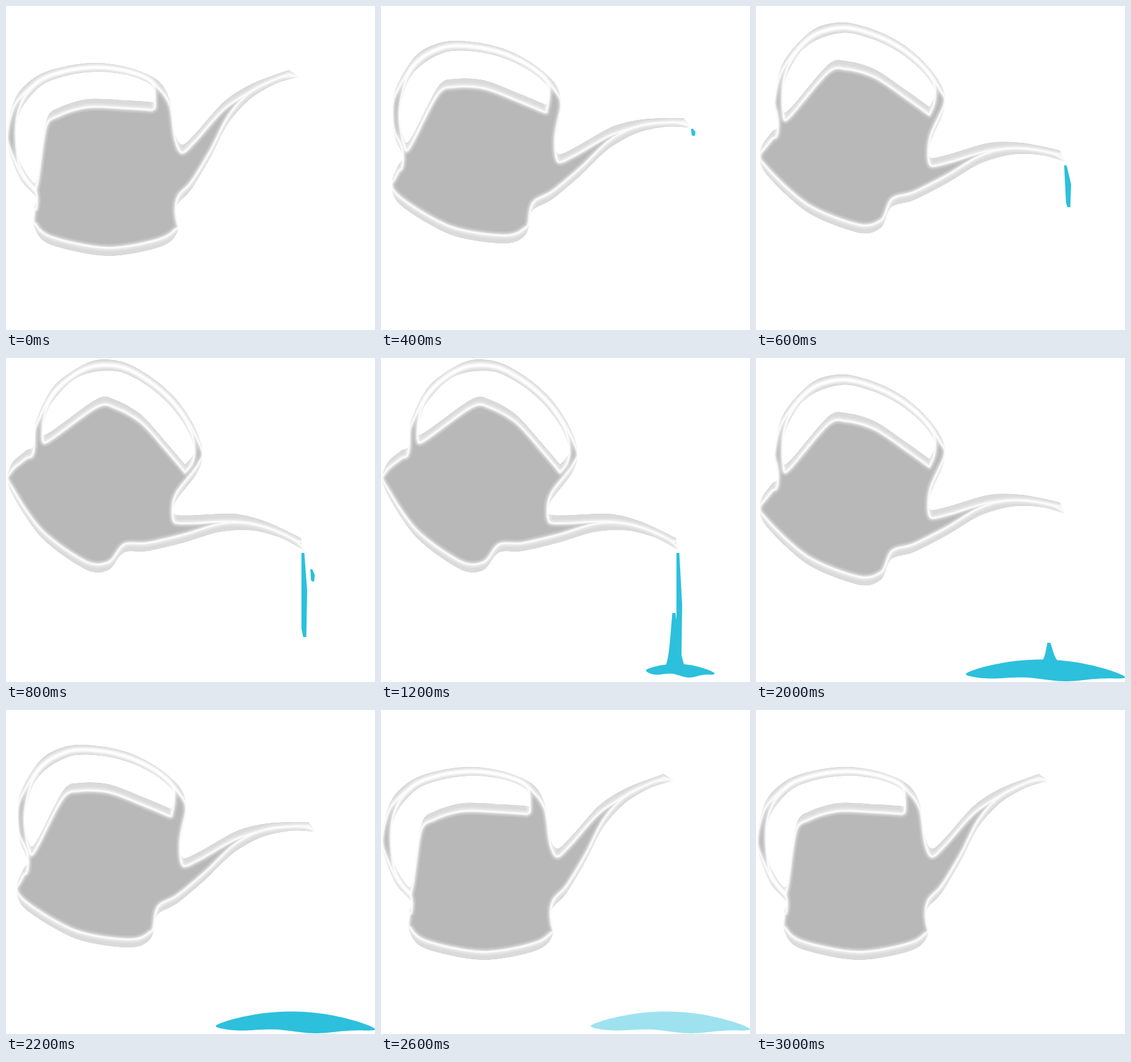
These frames come from a looping animation (582x512 px, 4 s). An HTML page with a canvas:

```html
<!DOCTYPE html>
<html lang="en">
<head>
<meta charset="utf-8">
<title>Watering can</title>
<style>
html, body { margin: 0; width: 100%; height: 100%; overflow: hidden; background: #fff; }
canvas { display: block; }
</style>
</head>
<body>
<canvas id="stage" width="582" height="512"></canvas>
<script>
const ctx = document.getElementById('stage').getContext('2d');
const STEP = 200, LOOP = 4000;
const WATER = '#2cc0dc';

const points = text => text.trim().split(/\s+/).map(p => p.split(',').map(Number));

// The upright can: spout, base, handle and back to the spout.
const RIM = points(`446,101 462,112 425,123 385,147 350,186 322,240 292,290 268,318
  271,355 245,380 160,395 70,377 45,350 45,318 48,303
  22,272 2,212 15,145 50,110 100,94 150,90 200,99 240,118 258,148 266,200
  278,219 300,200 345,150 390,122`);
const HOLE = points(`40,276 20,240 16,190 29,155 60,123 105,108 150,104 195,110 230,126
  235,152 190,149 130,147 85,160 64,180 50,271`);

// The can turns about the foot of its handle while the foot is lifted.
const PIVOT = [47, 303];
const POSES = [
  { x: 47, y: 303, angle: 0 },
  { x: 37, y: 273.5, angle: 10 },
  { x: 34, y: 238, angle: 19 },
  { x: 34, y: 188, angle: 32 },
  { x: 43, y: 138, angle: 46 }
];

function place(pts, { x, y, angle }) {
  const c = Math.cos(angle * Math.PI / 180), s = Math.sin(angle * Math.PI / 180);
  return pts.map(([px, py]) => {
    const dx = px - PIVOT[0], dy = py - PIVOT[1];
    return [x + c * dx - s * dy, y + s * dx + c * dy];
  });
}

// Closed Hermite curve through the points, with sharp corners where asked.
function smooth(pts, corners, detail = 8) {
  const n = pts.length, out = [];
  const tangent = (i, k) => corners.includes(i) ? 0
    : (pts[(i + 1) % n][k] - pts[(i + n - 1) % n][k]) * 0.45;
  for (let i = 0; i < n; i++) {
    const j = (i + 1) % n;
    for (let s = 0; s < detail; s++) {
      const t = s / detail, t2 = t * t, t3 = t2 * t;
      out.push([0, 1].map(k =>
        (2 * t3 - 3 * t2 + 1) * pts[i][k] + (t3 - 2 * t2 + t) * tangent(i, k) +
        (3 * t2 - 2 * t3) * pts[j][k] + (t3 - t2) * tangent(j, k)));
    }
  }
  return out;
}

function trace(pts, path = new Path2D()) {
  pts.forEach(([x, y], i) => i ? path.lineTo(x, y) : path.moveTo(x, y));
  path.closePath();
  return path;
}

// The highlight is the edge shifted vertically into the shape,
// at most to the middle of thin parts and not at all on upright sides.
function insetOf(curve, shape, side) {
  const n = curve.length, maxDepth = 13;
  const shifts = curve.map(([x, y], i) => {
    const a = curve[(i + n - 1) % n], b = curve[(i + 1) % n];
    const dx = b[0] - a[0], dy = b[1] - a[1];
    const slope = side * dx / (Math.hypot(dx, dy) || 1), dir = Math.sign(slope);
    let depth = 0;
    while (depth < maxDepth && ctx.isPointInPath(shape, x, y + dir * (2 * depth + 1), 'evenodd')) depth++;
    return depth * Math.tanh(slope * 2.5);
  });
  return curve.map(([x, y], i) => {
    let sum = 0;
    for (let k = -2; k <= 2; k++) sum += shifts[(i + k + n) % n];
    return [x, y + sum / 5];
  });
}

function bevel(curve, shape, side) {
  const inset = insetOf(curve, shape, side);
  ctx.fillStyle = '#dadada';
  ctx.fill(trace([...inset].reverse(), trace(curve)));
  return trace(inset);
}

function drawCan(pose) {
  const rim = smooth(place(RIM, pose), [0, 1]);
  const hole = smooth(place(HOLE, pose), [9]);
  const shape = trace(hole, trace(rim));
  ctx.save();
  ctx.clip(shape, 'evenodd');
  ctx.fillStyle = '#b8b8b8';
  ctx.fill(shape, 'evenodd');
  const lines = [bevel(rim, shape, 1), bevel(hole, shape, -1)];
  ctx.strokeStyle = '#fff';
  ctx.lineJoin = 'round';
  for (const [width, alpha] of [[13, .1], [10, .14], [7, .22], [4.5, .4], [2.2, .8]]) {
    ctx.lineWidth = width;
    ctx.globalAlpha = alpha;
    lines.forEach(line => ctx.stroke(line));
  }
  ctx.restore();
}

const fillWater = pts => ctx.fill(trace(pts));

// Puddle with a domed top and a rippled underside; spread runs from 0 to 1.
function puddle(spread) {
  const left = 418 - 87 * spread, right = 526 + 56 * spread;
  const height = 12 + 13 * spread * spread;
  const top = [], bottom = [];
  for (let i = 0; i <= 60; i++) {
    const u = (1 - Math.cos(Math.PI * i / 60)) / 2;
    const x = left + (right - left) * u, y = 493 + 6 * spread + 5 * u;
    const arch = Math.abs(Math.sin(Math.PI * u));
    const ripple = 2.5 * Math.cos(12 * (u - 0.1)) * arch ** 0.3;
    top.push([x, y - height * arch ** 0.75]);
    bottom.unshift([x, y + 6.5 * arch ** 0.3 + ripple]);
  }
  fillWater([...top, ...bottom]);
}

// Splash column that flares out towards the puddle.
function column(peak, flare = 1) {
  const left = [], right = [];
  for (let i = 0; i <= 20; i++) {
    const v = i / 20, half = 2.5 + 9 * v + 14 * flare * v ** 6;
    const x = 462 + 2 * v, y = peak + (487 - peak) * v;
    left.unshift([x - half, y]);
    right.push([x + half, y]);
  }
  fillWater([...right, ...left]);
}

// Falling water, slightly pointed at both ends.
function drip(x, top, width, bottom, drift = 0) {
  const h = bottom - top;
  fillWater([
    [x, top], [x + width * 0.5, top], [x + width + drift, top + h * 0.45],
    [x + width * 0.85 + drift, bottom], [x + width * 0.3 + drift, bottom], [x + drift, bottom - h * 0.1]
  ]);
}

const SPREAD = [0, 0.5, 0.77, 0.77, 1];

function drawWater(step) {
  ctx.fillStyle = WATER;
  if (step === 2) drip(489, 194, 6, 205, 1);
  if (step === 3) drip(486, 252, 8, 318, 3);
  if (step === 4) drip(480, 334, 6, 353, 1);
  if (step >= 4 && step <= 7) drip(466, 308, 9, step === 4 ? 441 : 491);
  if (step === 8) drip(463, 312, 7, 440);
  if (step === 9) {
    drip(460, 355, 5, 368);
    drip(463, 376, 4, 379);
  }
  if (step >= 6 && step <= 9) column(403, (step - 5) / 4);
  if (step === 10) column(450);
  if (step >= 6 && step <= 14) {
    ctx.globalAlpha = Math.min(1, (14.7 - step) / 3.7);
    puddle(SPREAD[Math.min(step - 6, 4)]);
    ctx.globalAlpha = 1;
  }
}

let shown = -1;
function frame(now) {
  const step = Math.floor(now % LOOP / STEP);
  if (step !== shown) {
    shown = step;
    const tilt = step < 10 ? Math.min(step, 4) : Math.max(13 - step, 0);
    ctx.clearRect(0, 0, 582, 512);
    drawCan(POSES[tilt]);
    drawWater(step);
  }
  requestAnimationFrame(frame);
}
frame(performance.now());
</script>
</body>
</html>
```
